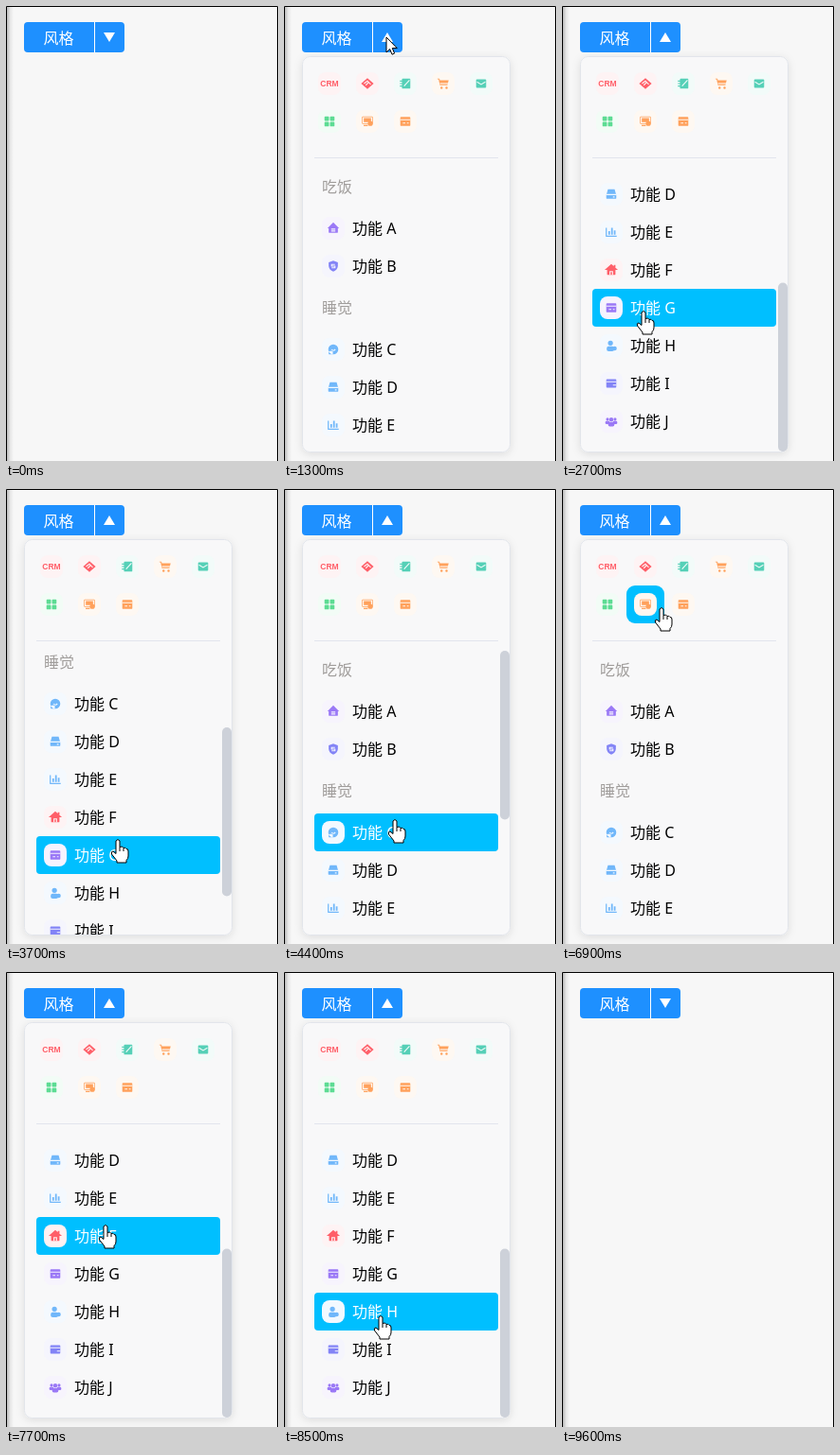
These frames come from a looping animation (287 px wide and 481 px high, 9900 ms). An HTML page:

```html
<!DOCTYPE html>
<html lang="zh">
<head>
<meta charset="utf-8">
<title>风格</title>
<style>
html, body { margin: 0; width: 100%; height: 100%; overflow: hidden; background: #f7f7f7; }
svg { display: block; width: 287px; height: 481px; }
text { font: 16px "Noto Sans", "Noto Sans CJK SC", "Noto Sans CJK", sans-serif; }
.crm { font: bold 8.5px "Liberation Sans", sans-serif; fill: var(--ink); }
.tile, .ink { --tint: color-mix(in srgb, var(--ink) 9%, white); }
.tile { fill: var(--tint); opacity: .8; }
.ink { fill: var(--ink); }
.cut { fill: none; stroke: color-mix(in srgb, var(--ink) 9%, white); stroke-width: 1.3; }
.hit { fill: none; }
.on > .hit { fill: deepskyblue; }
.on .tile { opacity: 1; }
.on > text { fill: #fff; }
</style>
</head>
<body>
<svg viewBox="0 0 287 481">
  <defs>
    <linearGradient id="edge">
      <stop offset="0" stop-color="#bdbdbd"/>
      <stop offset=".5" stop-color="#e6e6e6"/>
      <stop offset="1" stop-color="#f7f7f7"/>
    </linearGradient>
    <filter id="soft" x="-10%" y="-10%" width="120%" height="120%">
      <feDropShadow dx="0" dy="2" stdDeviation="4" flood-opacity=".1"/>
    </filter>
    <clipPath id="view"><rect x="20" y="171" width="218" height="300"/></clipPath>
  </defs>
  <rect width="287" height="481" fill="#f7f7f7"/>
  <rect x="1" width="7" height="481" fill="url(#edge)"/>
  <path d="M.5 481V.5H286.5V481" fill="none" stroke="#000"/>
  <rect x="19" y="17" width="106" height="32" rx="4" fill="dodgerblue"/>
  <path d="M93.5 17V49" stroke="#fff"/>
  <text x="55.5" y="39.5" text-anchor="middle" fill="#fff">风格</text>
  <path id="caret" fill="#fff"/>
  <g id="menu">
    <rect x="19.5" y="53.5" width="219" height="418" rx="8" fill="#f8f8f9" stroke="#e2e5eb" filter="url(#soft)"/>
    <g id="tools"></g>
    <path d="M32 160.5H226" stroke="#e2e5ee"/>
    <g clip-path="url(#view)"><g id="list"></g></g>
    <rect id="thumb" x="228" width="10" rx="5" fill="#cdd1d9"/>
  </g>
  <path id="cursor" fill="#fff" stroke="#000" stroke-linejoin="round"/>
</svg>
<script>
const $ = id => document.getElementById(id);
const LOOP = 9900, STEP = 100;
const CELL = 40, TOP = 171, VIEW = 300, MAX = 204;

const RED = '#ff5f69', TEAL = '#55d0b7', ORANGE = '#ffa15c', GREEN = '#5cdc93',
      VIOLET = '#9a78f6', INDIGO = '#8283f6', BLUE = '#70b7fa';

// icon parts, all centred on 0,0
const disc = (x, y, r) => `M${x - r} ${y}a${r} ${r} 0 1 0 ${2 * r} 0a${r} ${r} 0 1 0 ${-2 * r} 0Z`;
const box = (w, h, x = 0, y = 0, r = 1) =>
  `M${x - w / 2 + r} ${y - h / 2}h${w - 2 * r}q${r} 0 ${r} ${r}v${h - 2 * r}q0 ${r} ${-r} ${r}` +
  `h${2 * r - w}q${-r} 0 ${-r} ${-r}v${2 * r - h}q0 ${-r} ${r} ${-r}Z`;
const person = (x, y, r) => disc(x, y, r) + box(r * 3, r * 2, x, y + r * 2.3, r * .8);
const roof = w => `M0-7L${w} 0H${-w}Z`;
const each = (list, part) => list.map(part).join('');

const tools = [
  [RED],
  [RED, 'M0-6.5L7.5 0L0 6.5L-7.5 0Z', 'M-4 0L0-3L4 1M-2 2L1-1'],
  [TEAL, box(10, 12, 1) + each([-3, 0, 3], y => box(3, 1.4, -5, y, 0)), 'M-1.5 3L5-4'],
  [ORANGE, 'M-7-6H-4.5L-4-4H6.5L5 2H-4L-5.5-5H-7Z' + each([-2, 4], x => disc(x, 5, 1.4)), 'M-4 0H6'],
  [TEAL, box(12, 10), 'M-5-2L0 1L5-2'],
  [GREEN, each([-3.3, 3.3], x => each([-3.3, 3.3], y => box(5.4, 5.4, x, y)))],
  [ORANGE, box(13, 9, 0, -1.5) + box(5, 1.4, -2, 5, 0), box(10, 6, 0, -1.5, 0), disc(3.5, 2.5, 3)],
  [ORANGE, box(12, 11), 'M-6-2H6M-3 2H0M2 2H4']
];
const rows = [
  [VIOLET, roof(7) + box(11, 7, 0, 2), 'M-2.5 1H2.5M-2.5 3.2H2.5'],
  [INDIGO, 'M0-6.5L5.5-4.5V0Q5 4.5 0 6.5Q-5 4.5-5.5 0V-4.5Z', 'M2-2H-2V0H2V2H-2'],
  [BLUE, disc(0, 0, 6) + box(5, 4, -3, 4), 'M-2 0Q0 2.8 2.5 0'],
  [BLUE, 'M-4-6H4L6 1H-6Z' + box(12, 5, 0, 3), 'M-6 .5H6M2 3.3H4'],
  [BLUE, box(1.4, 10, -6, 0, 0) + box(13, 1.4, 0, 5, 0) + each([4, 8, 5], (h, i) => box(2, h, i * 3.3 - 2.5, 3 - h / 2, 0))],
  [RED, roof(8) + box(10, 7, 0, 2.5) + box(2, 4, 4, -4, 0), 'M-1.5 6V2H1.5V6'],
  [VIOLET, box(12, 11), 'M-6-2H6M-3 2H0M2 2H4'],
  [BLUE, person(-1, -3, 3), '', disc(4, 3.5, 2.6)],
  [INDIGO, box(12, 10), 'M-6-2H6M2 2H6'],
  [VIOLET, each([-4.5, 4.5], x => person(x, -2.5, 1.8)) + person(0, -2, 2.5)]
];

const icon = ([ink, shape, cut = '', extra = ''], x, y) => `<g transform="translate(${x} ${y})" style="--ink:${ink}">
  <rect class="tile" x="-12" y="-12" width="24" height="24" rx="8"/>
  ${shape ? `<g transform="scale(.88)"><path class="ink" d="${shape}"/><path class="cut" d="${cut}"/><path class="ink" d="${extra}"/></g>`
          : '<text class="crm" y="3" text-anchor="middle">CRM</text>'}</g>`;
const hit = (x, y, w, r) => `<rect class="hit" x="${x}" y="${y - CELL / 2}" width="${w}" height="${CELL}" rx="${r}"/>`;
const title = (name, y) => `<text x="40" y="${y + 6}" fill="#a09d9b">${name}</text>`;
const toolPos = i => [48 + i % 5 * CELL, 82 + Math.floor(i / 5) * CELL];
const rowY = i => 235 + i * CELL + (i > 1 ? 48 : 0);

$('tools').innerHTML = each(tools, (d, i) => {
  const [x, y] = toolPos(i);
  return `<g>${hit(x - CELL / 2, y, CELL, 9)}${icon(d, x, y)}</g>`;
});
$('list').innerHTML = each(rows, (d, i) => {
  const y = rowY(i), letter = String.fromCharCode(65 + i);
  return `<g>${hit(32, y, 194, 4)}${icon(d, 52, y)}<text x="72" y="${y + 6}">功能 ${letter}</text></g>`;
}) + title('吃饭', 191) + title('睡觉', 319);
const toolEls = [...$('tools').children], rowEls = [...$('list').children].slice(0, rows.length);

const THUMB = VIEW * VIEW / (VIEW + MAX);
$('thumb').setAttribute('height', THUMB);

const ARROW = 'M0 0V16L3.7 12.6L6 18.2L8.6 17.1L6.3 11.6H11.3Z';
const HAND = 'M-2 1Q0-2 2 1V7.5Q5 6 6 8.5Q8 7.5 9 9.5Q11 9 11 12V17Q11 20 9 21.5V24H-1V22L-6.5 15Q-7.5 12-5 12L-2 14.5ZM2 7.5V12M6 8.5V12';

// pointer stops: time, x, y
const CARET = [108, 33];
const stops = [
  [100, 280, 25], [500, 150, 27], [600, 150, 27], [900, ...CARET], [1300, ...CARET],
  [2200, 86, 323], [2800, 86, 323], [3200, 118, 371], [4300, 118, 371], [4400, 117, 350],
  [5300, 100, 104], [5600, 54, 108], [6000, ...CARET], [6600, ...CARET], [7300, 100, 250],
  [7700, 105, 268], [8300, 100, 440], [9300, 110, 58], [9500, 242, 20], [9600, 300, 13]
];

const ramp = (t, from, to) => Math.min(1, Math.max(0, (t - from) / (to - from)));
const scrollAt = t => t > 9500 ? 0 : MAX * (ramp(t, 2200, 2600) - ramp(t, 3500, 4100) + ramp(t, 7300, 7600));
const openAt = t => ramp(t, 800, 1000) - ramp(t, 6000, 6200) + ramp(t, 6500, 6700) - ramp(t, 9300, 9500);

function pointerAt(t) {
  if (t < stops[0][0]) return [300, 25];
  const n = stops.findIndex(s => s[0] >= t);
  if (n < 1) return stops.at(n).slice(1);
  const [t0, x0, y0] = stops[n - 1], [t1, x1, y1] = stops[n], k = ramp(t, t0, t1);
  return [Math.round(x0 + (x1 - x0) * k), Math.round(y0 + (y1 - y0) * k)];
}

function set(id, attrs) {
  for (const name in attrs) $(id).setAttribute(name, attrs[name]);
}

function draw(t) {
  const [x, y] = pointerAt(t), top = Math.round(scrollAt(t)), alpha = openAt(t);
  const open = alpha > 0, inList = open && x > 19 && x < 239 && y >= TOP && y < TOP + VIEW;
  const within = d => d >= -CELL / 2 && d < CELL / 2;
  let hand = false;
  const mark = (el, on) => { el.classList.toggle('on', on); hand = hand || on; };
  toolEls.forEach((el, i) => {
    const [cx, cy] = toolPos(i);
    mark(el, open && within(x - cx) && within(y - cy));
  });
  rowEls.forEach((el, i) => mark(el, inList && x >= 32 && x < 226 && within(y + top - rowY(i))));
  set('menu', { opacity: alpha });
  set('caret', { d: open ? 'M103 38H115L109 28Z' : 'M103 28H115L109 38Z' });
  set('list', { transform: `translate(0 ${-top})` });
  set('thumb', { y: TOP + top / MAX * (VIEW - THUMB), opacity: inList ? 1 : 0 });
  set('cursor', { d: hand ? HAND : ARROW, transform: `translate(${x} ${y})` });
}

const start = performance.now();
function tick() {
  const t = (performance.now() - start) % LOOP;
  draw(Math.floor(t / STEP) * STEP);
  requestAnimationFrame(tick);
}
tick();
</script>
</body>
</html>
```
